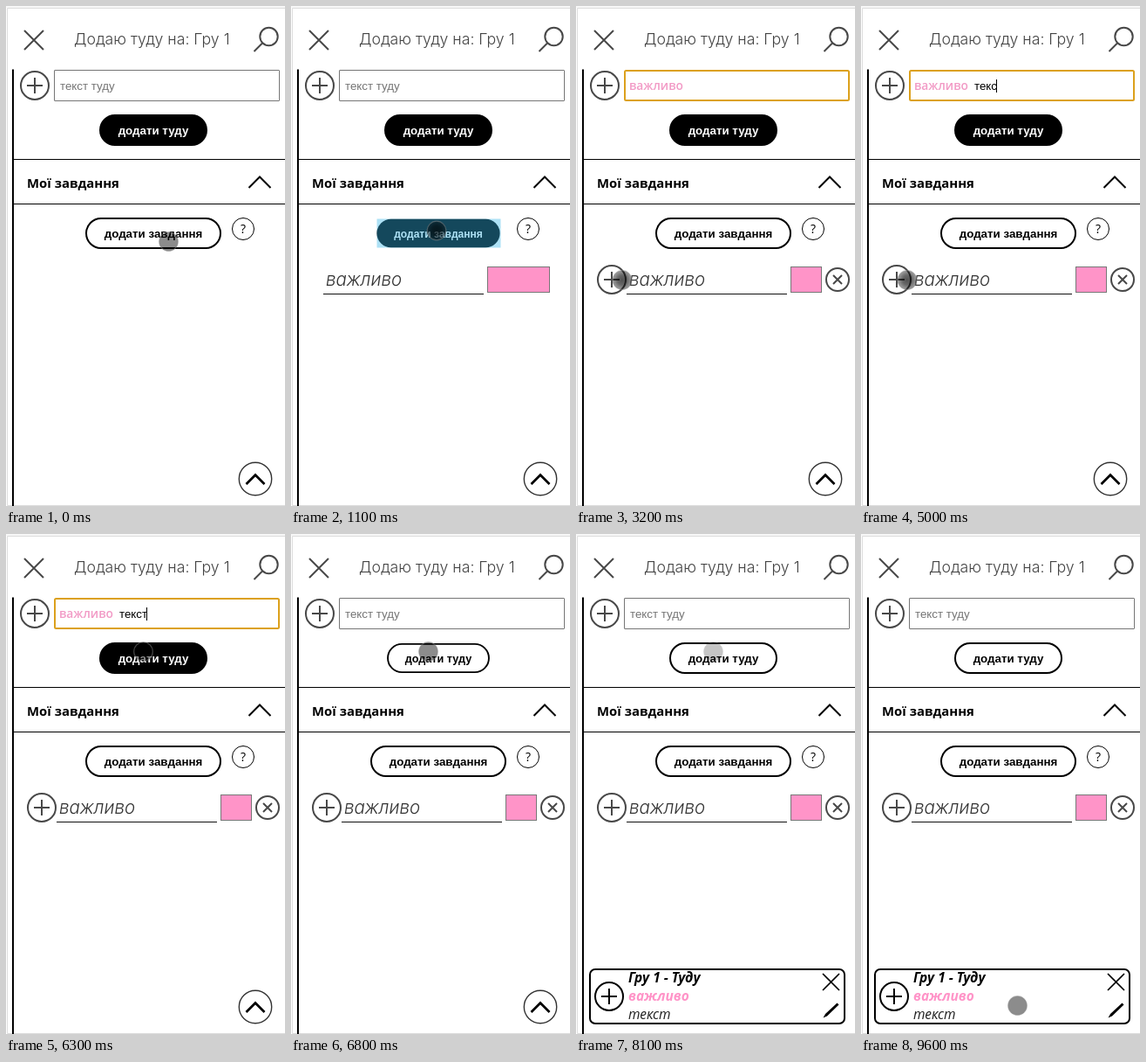
Recreate the animation shown at these times as an HTML page. Size 320 by 572 pixels, loop 9.9 s.

```html
<!DOCTYPE html>
<html lang="uk">
<head>
<meta charset="utf-8">
<title>Туду</title>
<style>
  html, body { margin: 0; width: 100%; height: 100%; overflow: hidden; background: #fff; }
  svg { display: block; width: 100%; height: 100%; }
  .line { fill: none; stroke: #000; stroke-width: 2; }
  .soft { stroke: #484848; }
  .field { font: 13.333px "Liberation Sans", Arial, sans-serif; }
  .label { font: bold 13.333px "Liberation Sans", Arial, sans-serif; text-anchor: middle; }
  .ui { font-family: "Open Sans", "Noto Sans", sans-serif; }
  .thin { font-family: Inter, Roboto, sans-serif; font-weight: 300; }
  .button { transform-box: fill-box; transform-origin: center; }
  .button rect { fill: #fff; stroke: #000; stroke-width: 2; }
  .button.dark rect { fill: #000; }
  .button.dark text { fill: #fff; }
  .tap { fill: rgba(51, 181, 229, .4); }
  .pink { fill: #ff94c8; }
</style>
</head>
<body>
<svg viewBox="0 0 320 572" xmlns="http://www.w3.org/2000/svg">
  <defs>
    <radialGradient id="pressed">
      <stop offset="0" stop-opacity=".68"/>
      <stop offset=".5" stop-opacity=".6"/>
      <stop offset="1" stop-opacity=".38"/>
    </radialGradient>
    <filter id="shadow" x="-10%" y="-10%" width="120%" height="125%">
      <feDropShadow dx="0" dy="1" stdDeviation="1.5" flood-opacity=".28"/>
    </filter>
    <g id="plus"><circle r="16"/><path d="M-9 0H9M0-9V9"/></g>
  </defs>

  <rect width="320" height="572" fill="#fff"/>
  <rect width="320" height="2" fill="#f7f7f7"/>
  <path d="M320 2.5H1.5V571.5H320" fill="none" stroke="#dcdcdc"/>

  <path class="line soft" d="M21 28L43 50M43 28L21 50" stroke-width="2"/>
  <text class="thin" x="78" y="44" font-size="17.7" fill="#444">Додаю туду на: Гру 1</text>
  <g class="line soft"><circle cx="301.5" cy="35" r="10.2"/><path d="M294 42.5L284.5 52"/></g>

  <path class="line" d="M8 72.5V572"/>
  <use href="#plus" class="line soft" x="33" y="91"/>
  <rect id="input" fill="#fff"/>
  <text id="hint" class="field" x="62" y="96" fill="#757575">текст туду</text>
  <g id="entry">
    <text class="ui" x="61" y="96" font-size="13.8" font-weight="600" fill="#f29bc6">важливо</text>
    <text id="typed" class="field" x="130" y="96"></text>
    <rect id="caret" y="84" width="1" height="15"/>
  </g>

  <g id="addTodo" class="button">
    <rect x="108" y="125" width="122" height="34" rx="17"/>
    <text class="label" x="169" y="147">додати туду</text>
  </g>
  <rect id="todoTap" class="tap" x="113" y="126" width="112" height="33"/>

  <path d="M9 175.5H320M9 226.5H320" stroke="#000"/>
  <text class="ui" x="24" y="208" font-size="14.9" font-weight="700">Мої завдання</text>
  <path class="line" d="M278.5 208L291 195.5L303.5 208"/>

  <g id="addTask" class="button">
    <rect x="92" y="243" width="154" height="34" rx="17"/>
    <text class="label" x="169" y="265">додати завдання</text>
  </g>
  <rect id="taskTap" class="tap" x="98.5" y="243.5" width="142" height="33"/>
  <circle cx="272" cy="255" r="12.5" fill="none" stroke="#000"/>
  <text class="ui" x="272" y="260" font-size="14" text-anchor="middle">?</text>

  <g id="task">
    <g id="taskText">
      <text class="thin" x="40" y="320" font-size="20.5" font-style="italic" fill="#333">важливо</text>
      <path d="M37 329.5H221" stroke="#111"/>
    </g>
    <rect id="swatch" class="pink" y="298.5" height="29" stroke="#777"/>
    <g id="taskIcons" class="line soft">
      <use href="#plus" x="41" y="313"/>
      <circle cx="300" cy="313" r="13"/>
      <path d="M295 308L305 318M305 308L295 318"/>
    </g>
    <rect id="taskCaret" x="152" y="301" width="1" height="25"/>
  </g>

  <g id="menu">
    <path d="M131 339H149L154 334.5L159 339H222Q225 339 225 342V416Q225 419 222 419H131Q128.500 419 128.500 416V342Q128.500 339 131 339Z"
      fill="#fff" filter="url(#shadow)"/>
    <g class="field" fill="#222"><text x="141" y="366">важливо</text><text x="141" y="402">важливо</text></g>
  </g>

  <g id="card">
    <rect class="line" x="16" y="498" width="292" height="62" rx="6" style="fill:#fff"/>
    <use href="#plus" class="line" x="38" y="529"/>
    <g class="ui" font-size="15.5" font-style="italic">
      <text x="60" y="513" font-weight="700">Гру 1 - Туду</text>
      <text class="pink" x="60" y="534" font-weight="700">важливо</text>
      <text x="60" y="555" fill="#222">текст</text>
    </g>
    <path class="line" d="M283 503L302 522M302 503L283 522" style="stroke-width:1.7"/>
    <path d="M283.500 553.500L286 549L299.500 536.500L301.500 538.500L288 551.500Z"/>
  </g>

  <g id="toTop">
    <circle cx="286" cy="541" r="18.7" fill="#fff" stroke="#333" stroke-width="1.4"/>
    <path class="line" d="M275.500 547L286 536.500L296.500 547" style="stroke-width:2.7"/>
  </g>

  <circle id="pointer" r="10.8" stroke="#888" stroke-opacity=".5" stroke-width="1.2"/>
</svg>

<script>
const LOOP = 9900, TICK = 100;
const ui = Object.fromEntries([...document.querySelectorAll("svg > [id], svg g [id]")].map(el => [el.id, el]));

// Each track is a list of [start, value] steps.
const tracks = {
  pointer: [
    [0, [186.5, 269.5, 1]], [400, null], [600, [167, 257, .6]], [700, [167, 257, 1]],
    [900, [167, 257, 1, true]], [1300, [167, 257, 1]], [1700, null],
    [2300, [53, 313.5, 1, true]], [5100, [53, 313.5, .5]], [5200, null],
    [6300, [157.5, 134.5, 1]], [8100, [157.5, 134.5, .5]], [8200, null],
    [9600, [179.5, 539.5, 1]]
  ],
  taskScale: [[0, 1], [900, .96], [1000, .92], [1100, .905], [1200, .94], [1300, .97], [1400, 1]],
  taskDark: [[0, false], [900, true], [1300, false]],
  taskTap: [[0, false], [1000, true], [1200, false]],
  todoScale: [[0, 1], [6600, .95], [6700, .905], [6800, .95], [6900, 1]],
  todoDark: [[0, true], [6800, false]],
  todoTap: [[0, false], [6700, true], [6800, false]],
  task: [[0, false], [1000, true]],
  compact: [[0, false], [1700, true]],
  taskCaret: [[0, false], [1900, true], [2600, false]],
  menu: [[0, 0], [1800, .4], [1900, .8], [2000, 1], [2600, .6], [2700, .25], [2800, 0]],
  entry: [[0, false], [2600, true], [6800, false]],
  typed: [[0, 0], [3600, 1], [3900, 2], [4600, 3], [5000, 4], [5100, 5]],
  caret: [[0, false], [2700, true], [3200, false], [3600, true], [4400, false],
          [4600, true], [5800, false], [6300, true]]
};

const at = (name, t) => tracks[name].findLast(([start]) => start <= t)[1];
const show = (el, on) => { el.style.display = on ? "" : "none"; };
const set = (el, attrs) => { for (const k in attrs) el.setAttribute(k, attrs[k]); };

function drawButton(el, scale, dark) {
  el.style.transform = `scale(${scale})`;
  el.classList.toggle("dark", dark);
}

function drawPointer(state) {
  show(ui.pointer, state);
  if (!state) return;
  const [cx, cy, opacity, pressed] = state;
  set(ui.pointer, { cx, cy, opacity, fill: pressed ? "url(#pressed)" : "rgba(0,0,0,.45)" });
}

function drawInput(t) {
  const focused = at("entry", t);
  set(ui.input, focused
    ? { x: 56, y: 74, width: 257, height: 34, rx: 1.5, stroke: "#dca11c", "stroke-width": 2 }
    : { x: 55.5, y: 73.5, width: 258, height: 35, rx: 0.5, stroke: "#767676", "stroke-width": 1 });
  show(ui.hint, !focused);
  show(ui.entry, focused);
  if (!focused) return;
  ui.typed.textContent = "текст".slice(0, at("typed", t));
  show(ui.caret, at("caret", t));
  set(ui.caret, { x: Math.floor(129.4 + ui.typed.getComputedTextLength()) });
}

function drawTask(t) {
  const compact = at("compact", t);
  show(ui.task, at("task", t));
  show(ui.taskIcons, compact);
  show(ui.taskCaret, at("taskCaret", t));
  set(ui.taskText, { transform: `translate(${compact ? 21 : 0})` });
  set(ui.swatch, compact ? { x: 246.5, width: 35 } : { x: 225.5, width: 71 });
  set(ui.menu, { opacity: at("menu", t) });
}

function drawCard(t) {
  const left = (1 - Math.min(1, Math.max(0, (t - 6800) / 500))) ** 3;
  show(ui.card, left < 1);
  set(ui.card, { transform: `translate(0 ${75 * left})` });
  set(ui.toTop, { opacity: left });
}

function render(t) {
  drawInput(t);
  drawTask(t);
  drawCard(t);
  drawButton(ui.addTodo, at("todoScale", t), at("todoDark", t));
  drawButton(ui.addTask, at("taskScale", t), at("taskDark", t));
  show(ui.todoTap, at("todoTap", t));
  show(ui.taskTap, at("taskTap", t));
  drawPointer(at("pointer", t));
}

const begin = performance.now();
function frame() {
  const t = (performance.now() - begin) % LOOP;
  render(Math.floor(t / TICK) * TICK);
  requestAnimationFrame(frame);
}
frame();
</script>
</body>
</html>
```
